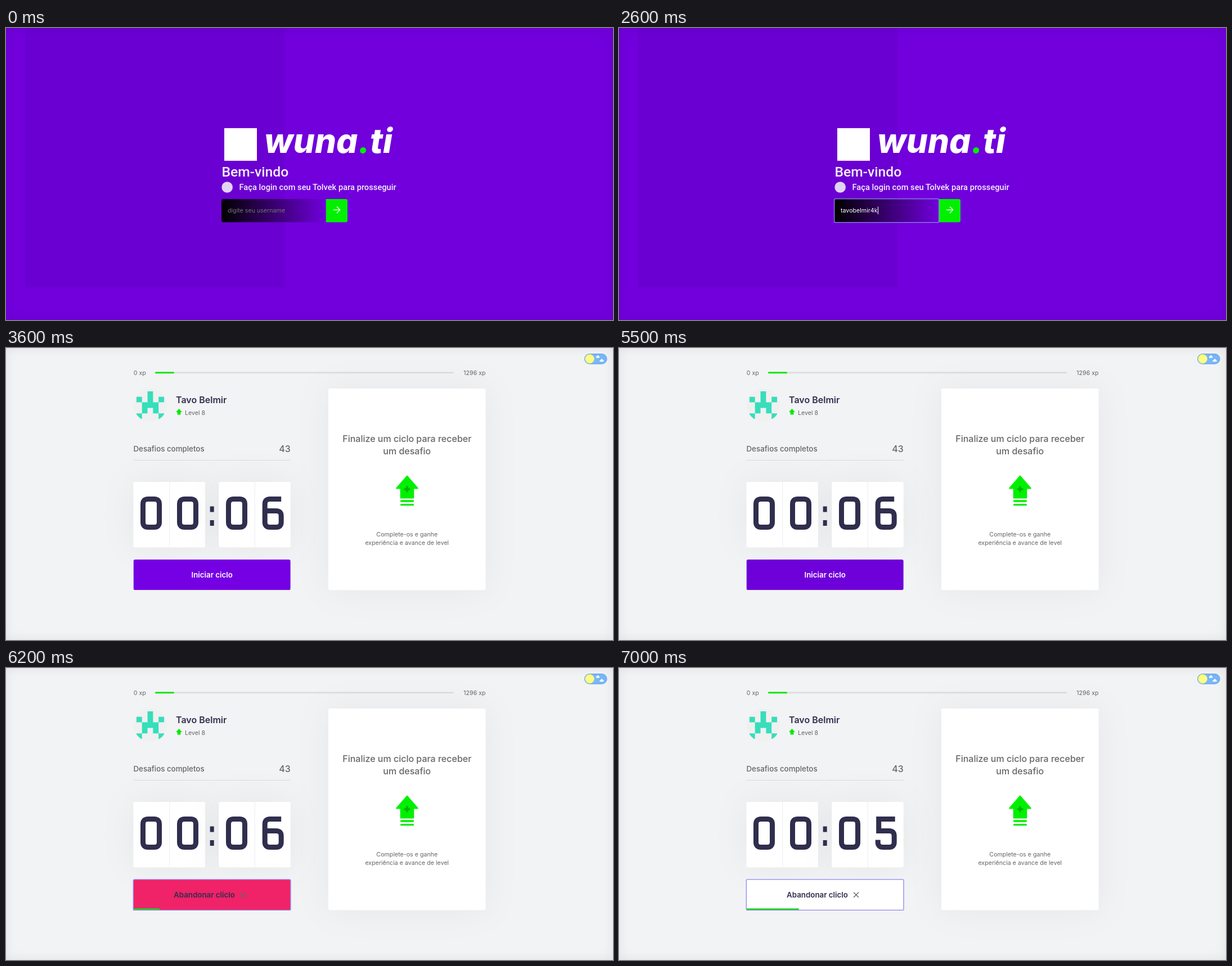
An HTML page that plays this animation: 1079 px wide and 519 px high, repeating every 8000 ms.

```html
<!DOCTYPE html>
<html lang="pt-BR">
<head>
<meta charset="utf-8">
<title>Ciclo</title>
<style>
html, body { margin: 0; width: 100%; height: 100%; overflow: hidden; background: #f2f3f5; }
svg { display: block; width: 100%; height: 100%; }
text { font-family: Inter, "Open Sans", sans-serif; font-size: 10.67px; white-space: pre; }
.head { font-family: Roboto, "Noto Sans", sans-serif; font-weight: 500; fill: #f6f0fe; }
.brand { font-size: 60px; font-weight: 800; font-style: italic; fill: #fff; }
.muted { fill: #666; }
.medium { font-weight: 500; }
.bold { font-weight: 600; }
.s13 { font-size: 13.33px; }
.s16 { font-size: 16px; }
.mid { text-anchor: middle; }
.end { text-anchor: end; }
.digit { fill: none; stroke: #302e4d; stroke-width: 9; }
.ring { fill: none; stroke: #8f85f2; stroke-width: 1.3; }
#edge { position: fixed; inset: 0; box-shadow: inset 0 0 20px rgba(0,0,0,.08); }
</style>
</head>
<body>
<svg viewBox="0 0 1079 519" preserveAspectRatio="none">
  <defs>
    <linearGradient id="fade">
      <stop stop-color="#000"/>
      <stop offset="1" stop-color="#7100dc"/>
    </linearGradient>
    <filter id="shadow" filterUnits="userSpaceOnUse" x="0" y="0" width="1079" height="519">
      <feDropShadow dx="0" dy="0" stdDeviation="30" flood-color="#000" flood-opacity=".05"/>
    </filter>
    <clipPath id="round"><circle cx="256.5" cy="101.5" r="29.5"/></clipPath>
    <clipPath id="buttonShape"><rect x="226.5" y="376" width="279.3" height="54.3" rx="3.3"/></clipPath>
  </defs>

  <g id="login">
    <rect width="1079" height="519" fill="#7100dc"/>
    <rect x="34" width="461" height="461" fill="#6b00d2"/>
    <rect x="388" y="178" width="58" height="58" fill="#fff"/>
    <text class="brand" y="222"><tspan x="459">wuna</tspan><tspan x="626" fill="#00f000">.</tspan><tspan x="647">ti</tspan></text>
    <text class="head" x="383.5" y="264" style="font-size:24.7px">Bem-vindo</text>
    <circle cx="393.2" cy="283" r="9.8" fill="#e1d4f3"/>
    <text class="head" x="414.5" y="288" style="font-size:14.7px">Faça login com seu Tolvek para prosseguir</text>
    <path d="M569 304H386.3Q383 304 383 307.3V342Q383 345.3 386.3 345.3H569Z" fill="url(#fade)"/>
    <path d="M568.7 304H603.7Q607 304 607 307.3V342Q607 345.3 603.7 345.3H568.7Z" fill="#00f000"/>
    <path d="M581.7 323.3H593.5M588 317.5L593.8 323.3L588 329.1" fill="none" stroke="#fff" stroke-width="1.3"/>
    <text id="entry" x="394" y="328"></text>
    <rect id="caret" y="317.5" width="1" height="13.5" fill="#fff"/>
    <rect id="inputRing" class="ring" x="382.7" y="303.7" width="186" height="41.9" rx="2"/>
    <rect id="sendRing" class="ring" x="568.4" y="303.7" width="38.7" height="41.9" rx="2"/>
  </g>

  <g id="dashboard">
    <rect width="1079" height="519" fill="#f2f3f5"/>
    <text class="muted" x="226.7" y="48">0 xp</text>
    <text class="muted end" x="852.6" y="48">1296 xp</text>
    <rect x="265" y="42.5" width="531" height="2.8" rx="1.4" fill="#dcdde0"/>
    <rect x="265" y="42.5" width="34" height="2.8" rx="1.4" fill="#00eb00"/>

    <g clip-path="url(#round)">
      <rect x="227" y="72" width="59" height="59" fill="#f0f0f0"/>
      <path id="avatar" fill="#36debb"/>
    </g>
    <text class="bold s16" x="302" y="98.4" fill="#302e4d">Tavo Belmir</text>
    <path d="M307.5 108L313 114H310.4V118.6H304.6V114H302Z" fill="#00eb00"/>
    <text class="muted" x="318" y="118.6">Level 8</text>
    <text class="muted medium s13" x="226.5" y="184.2">Desafios completos</text>
    <text class="muted medium s16 end" x="505.8" y="185">43</text>
    <path d="M226.5 199.5H505.8" stroke="#d9dadd"/>

    <g fill="#fff">
      <rect x="226.5" y="238" width="127.5" height="116.3" rx="3.3" filter="url(#shadow)"/>
      <rect x="378.3" y="238" width="127.5" height="116.3" rx="3.3" filter="url(#shadow)"/>
      <rect x="573" y="72" width="279.6" height="358.3" rx="3.3" filter="url(#shadow)"/>
    </g>
    <path d="M290.7 238V354.3M442.3 238V354.3" stroke="#ecedf0"/>
    <g id="clock" role="img"></g>
    <path d="M362.7 281.5h7v10h-7zM362.7 306h7v10h-7z" fill="#302e4d"/>

    <g clip-path="url(#buttonShape)">
      <rect id="button" x="226.5" y="376" width="279.3" height="54.3"/>
      <rect id="progress" x="226.5" y="427.3" height="3" fill="#14dc1c"/>
    </g>
    <text id="start" class="bold s13 mid" x="366.2" y="408" fill="#fff">Iniciar ciclo</text>
    <g id="stop">
      <text class="bold s13" x="298" y="408" fill="#302e4d">Abandonar cliclo</text>
      <path d="M417 398.7L426 407.7M426 398.7L417 407.7" stroke="#666" stroke-width="1.4"/>
    </g>
    <rect id="buttonRing" class="ring" x="226.3" y="375.9" width="279.7" height="54.5" rx="2"/>

    <text class="muted medium s16 mid" y="166.5"><tspan x="712.8">Finalize um ciclo para receber</tspan><tspan x="712.8" y="188.8">um desafio</tspan></text>
    <path d="M713 228L731.5 249.3H724V266.3H702V249.3H694.5Z" fill="#00f000" stroke="#00f000" stroke-width="2.6" stroke-linejoin="round"/>
    <path d="M702.5 272H723.5M702.5 278.6H723.5" stroke="#00f000" stroke-width="3.4" stroke-linecap="round"/>
    <path d="M709 251H717M713 247V255" stroke="#00b400" stroke-width="3.6" stroke-linecap="round"/>
    <text class="muted mid" y="335"><tspan x="712.8">Complete-os e ganhe</tspan><tspan x="712.8" y="350">experiência e avance de level</tspan></text>

    <rect x="1028.5" y="10.5" width="39.5" height="17.8" rx="8.9" fill="#78b6f8" stroke="#62a3ea"/>
    <circle cx="1037.6" cy="19.3" r="8" fill="#fdfd82" stroke="#e9e98a" stroke-width=".8"/>
    <path d="M1050 16.3H1054M1056.5 23H1061.5" stroke="#fff" stroke-width="2.6" stroke-linecap="round"/>
    <path d="M1052 15h.1M1059 21.5h.1" stroke="#fff" stroke-width="4" stroke-linecap="round"/>
  </g>
</svg>
<div id="edge"></div>
<script>
const LOOP = 8000;
const PURPLE = [117, 0, 228], HOVER = [105, 0, 211], PINK = [240, 34, 104], WHITE = [255, 255, 255];
const GLYPHS = {
  0: "M-5.5-25H5.5Q14.5-25 14.5-16V16Q14.5 25 5.5 25H-5.5Q-14.5 25-14.5 16V-16Q-14.5-25-5.5-25Z",
  5: "M16-25H-13V-4H5.5Q14.5-4 14.5 5V16Q14.5 25 5.5 25H-5.5Q-14.5 25-14.5 16V12",
  6: "M14.5-25H-5.5Q-14.5-25-14.5-16V16Q-14.5 25-5.5 25H5.5Q14.5 25 14.5 16V5Q14.5-4 5.5-4H-14.5"
};
const $ = id => document.getElementById(id);
const show = (id, on) => $(id).style.display = on ? "" : "none";
const within = (t, from, to) => t >= from && t < to;
const mix = (a, b, k) => `rgb(${a.map((v, i) => Math.round(v + (b[i] - v) * k))})`;

const CELL = 9.83;
$("avatar").setAttribute("d", ["..#..", "#.#.#", ".###.", ".#.#.", "#...#"].map((row, y) =>
  [...row].map((c, x) => c === "#" ? `M${231.9 + x * CELL} ${76.9 + y * CELL}h${CELL}v${CELL}h${-CELL}z` : "").join("")
).join(""));

const digits = [258, 323, 410, 474.7].map(x => {
  const path = document.createElementNS("http://www.w3.org/2000/svg", "path");
  path.setAttribute("class", "digit");
  path.setAttribute("transform", `translate(${x} 293.5)`);
  return $("clock").appendChild(path);
});

function drawLogin(t) {
  const typed = t >= 2600, entry = $("entry");
  entry.textContent = typed ? "tavobelmir4k" : "digite seu username";
  entry.setAttribute("fill", typed ? "#fff" : "#757575");
  show("inputRing", within(t, 900, 3100));
  show("sendRing", t >= 3100);
  show("caret", within(t, 900, 1500) || within(t, 2100, 3100));
  $("caret").setAttribute("x", typed ? 394.5 + entry.getComputedTextLength() : 393.5);
}

function buttonColor(t) {
  if (t < 5500) return mix(PURPLE, HOVER, 0);
  if (t < 6000) return mix(PURPLE, HOVER, t < 5600 ? .6 : t < 5700 ? .9 : 1);
  if (t < 6300) return mix(HOVER, PINK, t < 6100 ? .3 : t < 6200 ? .85 : 1);
  return mix(PINK, WHITE, t < 6400 ? .6 : 1);
}

function drawDashboard(t) {
  const running = t >= 6000, seconds = t < 7000 ? 6 : 5;
  const time = "000" + seconds;
  digits.forEach((path, i) => path.setAttribute("d", GLYPHS[time[i]]));
  $("clock").setAttribute("aria-label", "00:0" + seconds);
  $("button").setAttribute("fill", buttonColor(t));
  $("progress").setAttribute("width", running ? 279.3 * (7 - seconds) / 6 : 0);
  show("start", !running);
  show("stop", running);
  show("buttonRing", t >= 5800);
}

function draw(t) {
  const loggedIn = t >= 3600;
  show("login", !loggedIn);
  show("dashboard", loggedIn);
  if (loggedIn) drawDashboard(t); else drawLogin(t);
}

const began = performance.now();
function tick() {
  draw((performance.now() - began) % LOOP);
  requestAnimationFrame(tick);
}
tick();
</script>
</body>
</html>
```
